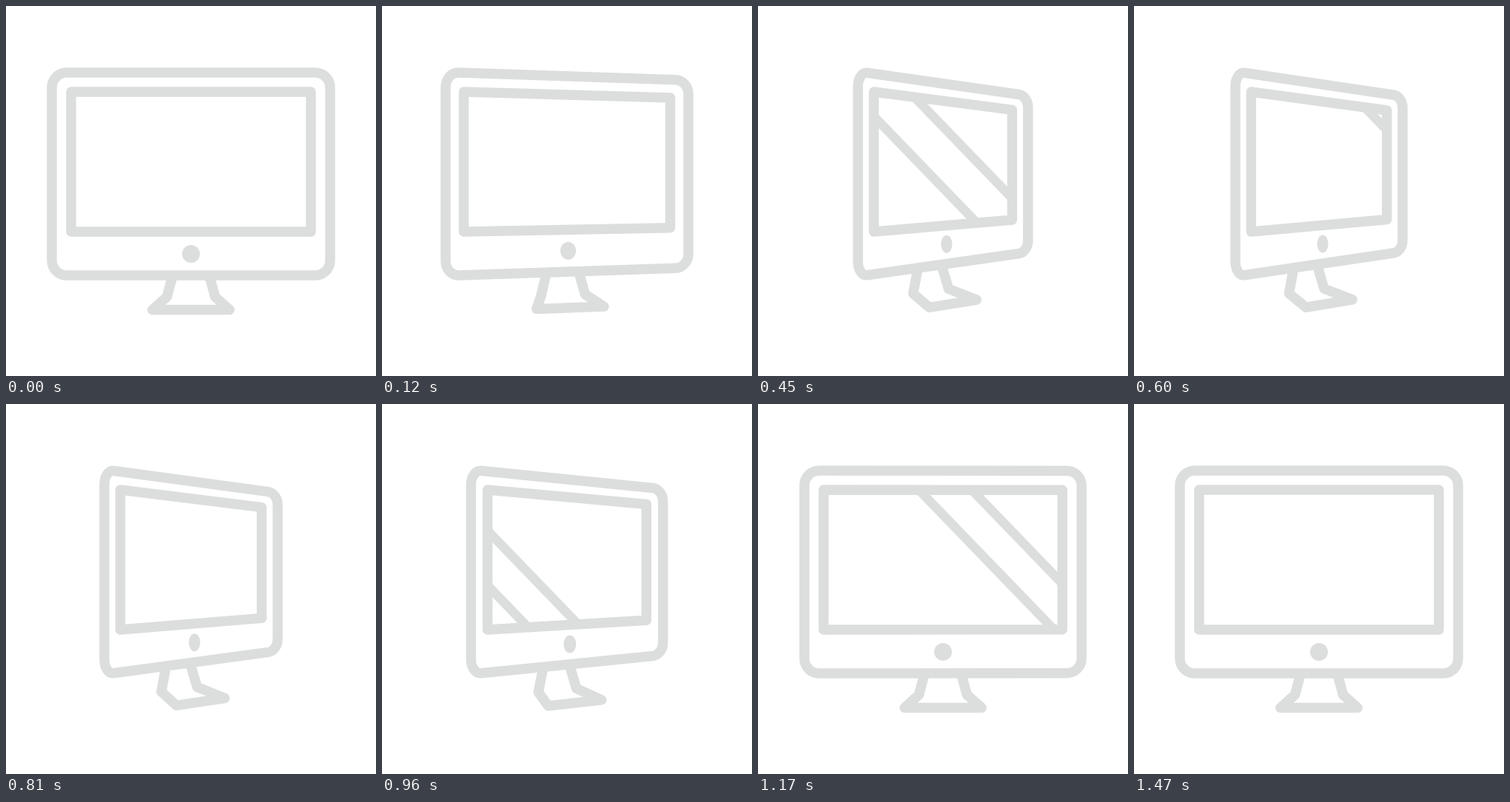
An HTML page for the animation above (1650 ms loop, 500 px wide and 500 px high).

```html
<!DOCTYPE html>
<html lang="en">
<head>
<meta charset="utf-8">
<title>Turning monitor</title>
<style>
  html, body { margin: 0; width: 100%; height: 100%; overflow: hidden; background: #fff; }
  svg { display: block; width: 100%; height: 100%; }
  .line { fill: none; stroke: #dcdedd; stroke-width: 13.5; stroke-linecap: round; stroke-linejoin: round; }
  .glint { stroke-width: 12.5; stroke-linecap: butt; }
</style>
</head>
<body>
<svg viewBox="0 0 500 500">
  <defs><clipPath id="glass"><path id="pane"/></clipPath></defs>
  <g clip-path="url(#glass)">
    <path id="lead" class="line glint"/>
    <path id="trail" class="line glint"/>
  </g>
  <path id="stand" class="line"/>
  <path id="body" class="line"/>
  <path id="screen" class="line"/>
  <ellipse id="dot" fill="#dcdedd"/>
</svg>
<script>
const LOOP = 1650, STEP = 30, TURN = 600, MID = 250;
const SLOPE = 1.035, DRAG = 0.00057;

// Front size, then how far the edges move when fully turned
const body = { half: 188, top: 90, bottom: 364, squash: 75, grow: 1.5, drop: 32, rise: 32 };
const screen = { half: 162, top: 116, bottom: 305, squash: 70.3, grow: 0, drop: 25, rise: 16.5 };

// Mirrored pairs of points, from the top down
const stand = [
  { half: 25, y: 365, shift: -18.5, shrink: 9, lift: 12.5 },
  { half: 32.5, y: 393, shift: -16.8, shrink: 8.8, lift: 7.8 },
  { half: 52.2, y: 410.5, shift: 13.8, shrink: 20.8, lift: 8.5 }
];

// Two sweeps of the reflection: position x at the given time, speed and spacing
const first = { time: 330, x: 133.5, speed: 1.337, gap: 80 };
const second = { time: 960, x: 170.5, speed: 1.07, gap: 71.5 };

const $ = id => document.getElementById(id);
const mix = (a, b, p) => a + (b - a) * p;
const along = (a, b, p) => a.map((v, i) => mix(v, b[i], p));
const poly = pts => "M" + pts.map(q => q.join(" ")).join("L");
const draw = (id, d) => $(id).setAttribute("d", d);

// The near side is on the left; the far side gets shorter
function panel(o, p) {
  const l = MID - o.half + o.squash * p, r = MID + o.half - o.squash * p;
  return [
    [l, o.top - o.grow * p], [r, o.top + o.drop * p],
    [r, o.bottom - o.rise * p], [l, o.bottom + o.grow * p]
  ];
}

// Corners cut at a share of each edge, so they foreshorten with it
function rounded(pts) {
  const share = [0.073, 0.0532];
  return pts.map((c, i) => {
    const a = along(c, pts[(i + 3) % 4], share[i % 2]);
    const b = along(c, pts[(i + 1) % 4], share[1 - i % 2]);
    const curve = [along(a, c, 0.55), along(b, c, 0.55), b].map(q => q.join(" "));
    return (i ? "L" : "M") + a.join(" ") + "C" + curve.join(" ");
  }).join("") + "Z";
}

function standLine(p) {
  const side = s => stand.map(o => [
    MID + o.shift * p + s * (o.half - o.shrink * p),
    o.y - (o.lift + s * o.half * 0.1) * p
  ]);
  return poly([...side(-1), ...side(1).reverse()]);
}

// cubic-bezier(1/3, 0, 0, 1), solved by bisection
function ease(x) {
  let lo = 0, hi = 1;
  for (let i = 0; i < 30; i++) {
    const s = (lo + hi) / 2;
    if ((1 - s) * (1 - s) * s + s * s * s < x) lo = s; else hi = s;
  }
  return lo * lo * (3 - 2 * lo);
}

// A slanted line crossing y = 200 at x
const slant = x => poly([[x - 150 / SLOPE, 50], [x + 150 / SLOPE, 350]]);

function drawGlint(t) {
  const g = t < 720 ? first : second, dt = t - g.time;
  const x = g.x + g.speed * dt - DRAG * dt * dt;
  draw("lead", slant(x));
  draw("trail", slant(x - g.gap));
}

function render(t) {
  const p = t < 2 * TURN ? ease(1 - Math.abs(t - TURN) / TURN) : 0;
  const frame = poly(panel(screen, p)) + "Z";
  draw("body", rounded(panel(body, p)));
  draw("screen", frame);
  draw("pane", frame);
  draw("stand", standLine(p));
  const dot = { cx: MID + 5 * p, cy: 335 - 13.5 * p, rx: 12 - 4.5 * p, ry: 12 };
  for (const k in dot) $("dot").setAttribute(k, dot[k]);
  drawGlint(t);
}

const start = performance.now();
function tick() {
  const t = (performance.now() - start) % LOOP;
  render(Math.floor(t / STEP) * STEP);
  requestAnimationFrame(tick);
}
tick();
</script>
</body>
</html>
```
